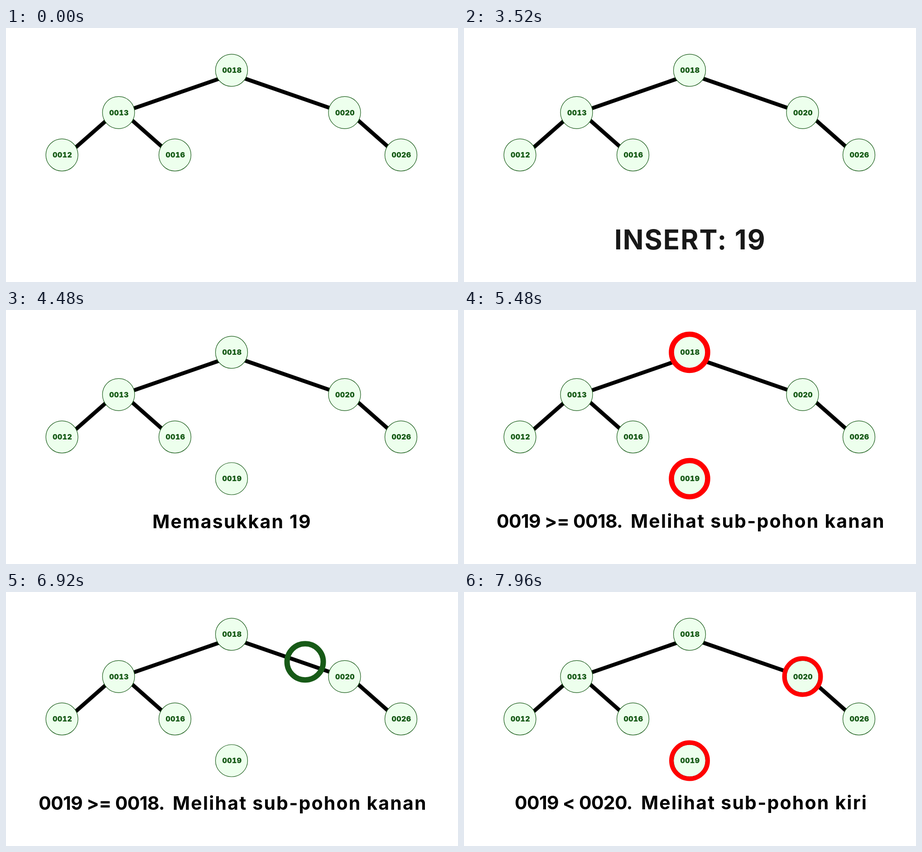
An HTML page that plays this animation: 998 by 561 pixels, repeating every 8 s.

```html
<!DOCTYPE html>
<html lang="id">
<head>
<meta charset="utf-8">
<title>Binary search tree: insert</title>
<style>
  html, body { margin: 0; width: 100%; height: 100%; overflow: hidden; background: #fff; }
  svg { display: block; width: 100vw; height: 100vh; }
  text {
    font-family: Inter, "Open Sans", sans-serif;
    font-weight: 700;
    font-variant-ligatures: none;
    white-space: pre;
  }
  .edge { stroke: #000; stroke-width: 8.6; }
  .node circle { fill: #edffed; stroke: #175a17; stroke-width: 1.2; }
  .node text {
    font-size: 16px; font-weight: 900; letter-spacing: .4px;
    font-variant-numeric: tabular-nums; text-anchor: middle; fill: #175a17;
  }
  .ring { fill: none; }
  .title { font-size: 60px; letter-spacing: .033em; }
  .words, .numbers { font-size: 41px; }
  .words { letter-spacing: .053em; }
  .numbers { letter-spacing: -.017em; }
</style>
</head>
<body>
<svg id="stage" viewBox="0 0 998 561"></svg>
<script>
const LOOP = 8000, FRAME = 40;
const RADIUS = 35.5, RING = 40;
const RED = '#ff0000', GREEN = '#175a17';
const stage = document.getElementById('stage');

function add(tag, attrs, parent = stage, content = '') {
  const el = document.createElementNS('http://www.w3.org/2000/svg', tag);
  for (const key in attrs) el.setAttribute(key, attrs[key]);
  el.textContent = content;
  parent.appendChild(el);
  return el;
}

const spots = {
  18: [498, 93.4],
  13: [248.5, 186.8], 20: [747.5, 186.8],
  12: [123.5, 280.4], 16: [373, 280.4], 26: [872, 280.4],
  19: [498, 372.5]
};

// Edges sit slightly right of the node centres
function addEdge(parent, child) {
  const [x1, y1] = spots[parent], [x2, y2] = spots[child];
  const [top, bottom] = parent === 18 ? [8.6, 1.7] : [-7.8, 8.6];
  const shift = 1.7;
  add('line', { class: 'edge', x1: x1 + shift, y1: y1 + top, x2: x2 + shift, y2: y2 + bottom });
}

function addNode(key) {
  const [cx, cy] = spots[key];
  const group = add('g', { class: 'node' });
  add('circle', { cx, cy, r: RADIUS }, group);
  add('text', { x: cx + 1, y: cy + 5.8 }, group, String(key).padStart(4, '0'));
  return group;
}

function addRing([cx, cy], color) {
  return add('circle', { class: 'ring', cx, cy, r: RING, stroke: color, 'stroke-width': 12 });
}

function addVerdict(y, comparisonX, comparison, adviceX, advice) {
  const group = add('g', {});
  add('text', { class: 'numbers', x: comparisonX, y }, group, comparison);
  add('text', { class: 'words', x: adviceX, y }, group, advice);
  return group;
}

[[18, 13], [18, 20], [13, 12], [13, 16], [20, 26]].forEach(pair => addEdge(...pair));
[18, 13, 20, 12, 16, 26].forEach(addNode);
const newNode = addNode(19);
const rootRing = addRing(spots[18], RED);
const childRing = addRing(spots[20], RED);
const newRing = addRing(spots[19], RED);
const cursor = addRing(spots[18], GREEN);

const title = add('text', { class: 'title', x: 332, y: 488.5 });
const inserting = add('text', { class: 'words', x: 499, y: 482, 'text-anchor': 'middle' },
  stage, 'Memasukkan 19');
const goRight = addVerdict(480.5, 72, '0019 >= 0018.', 368, 'Melihat sub-pohon kanan');
const goLeft = addVerdict(480, 112, '0019 < 0020.', 391, 'Melihat sub-pohon kiri');

// Number of characters typed at each time
const typing = [
  [1080, 1], [1520, 2], [1680, 3], [1760, 4], [1880, 5],
  [1960, 6], [2080, 7], [2480, 9], [2800, 10]
];
const FADE = 3470, SWAP = 3970, HALF = 500;
const STEP = 872, COMPARE_ROOT = 5480, MOVE = COMPARE_ROOT + STEP, COMPARE_CHILD = MOVE + STEP;

const clamp = v => Math.min(1, Math.max(0, v));
const show = (el, opacity) => { el.style.opacity = Number(opacity); };

function pulse(ring, phase) {
  const width = 6.5 + 5 * Math.abs(2 * phase - 1);
  const outer = RING + width / 2;
  const inner = Math.min(RADIUS - 0.3, RING - width / 2);
  ring.setAttribute('r', (outer + inner) / 2);
  ring.setAttribute('stroke-width', outer - inner);
}

function render(time) {
  const t = Math.floor(time % LOOP / FRAME) * FRAME;
  const typed = typing.reduce((n, [at, count]) => t >= at ? count : n, 0);
  title.textContent = 'INSERT: 19'.slice(0, typed);
  show(title, 1 - clamp((t - FADE) / HALF));

  const fadeIn = clamp((t - SWAP) / HALF);
  show(newNode, fadeIn);
  show(inserting, t < COMPARE_ROOT ? fadeIn : 0);

  const atRoot = t >= COMPARE_ROOT && t < MOVE;
  const moving = t >= MOVE && t < COMPARE_CHILD;
  const atChild = t >= COMPARE_CHILD;
  show(goRight, atRoot || moving);
  show(goLeft, atChild);
  show(rootRing, atRoot);
  show(childRing, atChild);
  show(newRing, atRoot || atChild);
  show(cursor, moving);

  const phase = clamp((t - (atChild ? COMPARE_CHILD : COMPARE_ROOT)) / STEP);
  [rootRing, childRing, newRing].forEach(ring => pulse(ring, phase));

  const way = clamp((t - MOVE) / STEP);
  const [from, to] = [spots[18], spots[20]];
  cursor.setAttribute('cx', from[0] + (to[0] - from[0]) * way);
  cursor.setAttribute('cy', from[1] + (to[1] - from[1]) * way);
}

const start = performance.now();
function tick() {
  render(performance.now() - start);
  requestAnimationFrame(tick);
}
tick();
</script>
</body>
</html>
```
